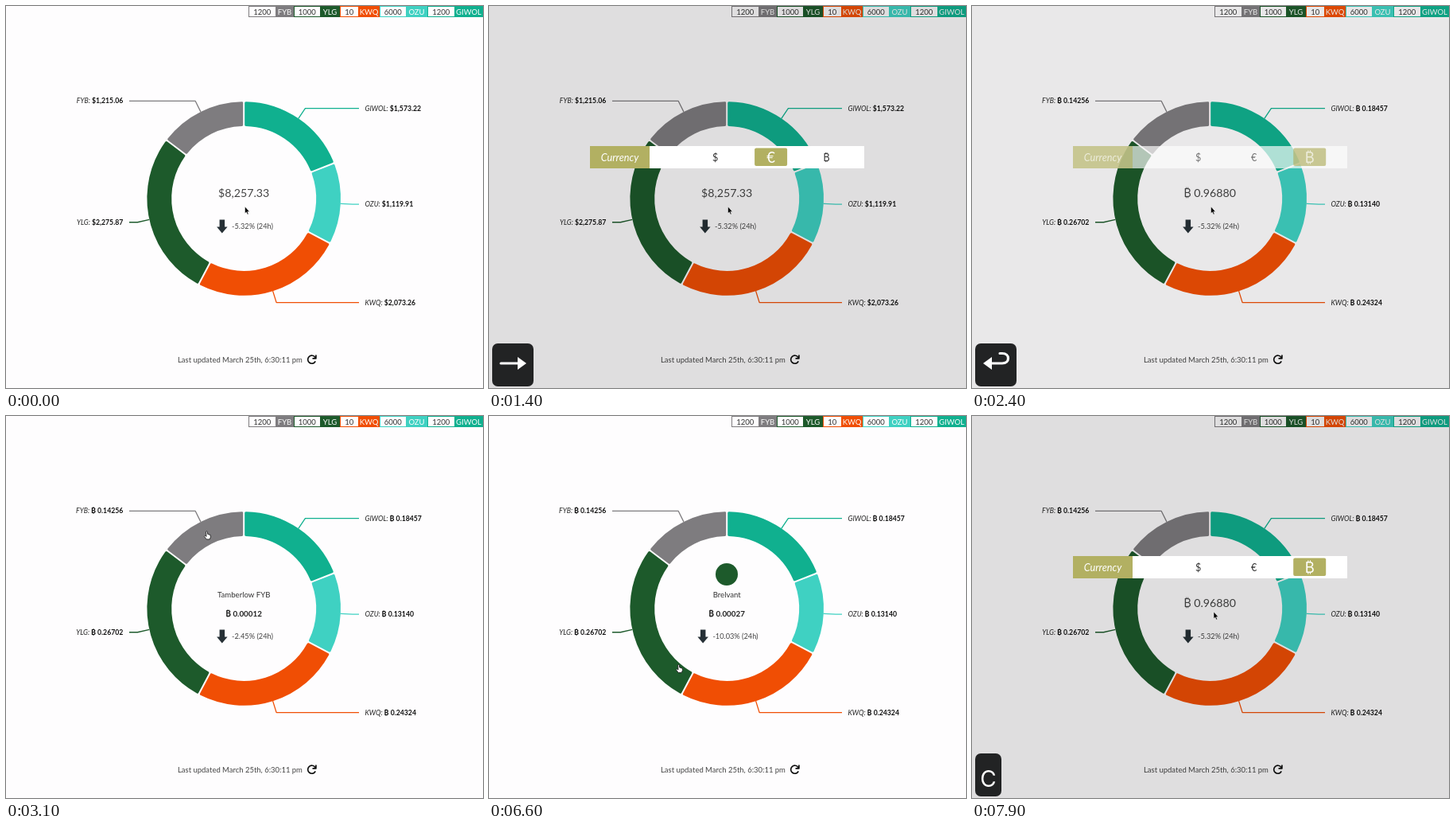
Animation of 600x480 px, one loop 8000 ms. Source, as an HTML page with a canvas:

```html
<!DOCTYPE html>
<html lang="en">
<head>
<meta charset="utf-8">
<title>Portfolio donut</title>
<style>
html, body { margin: 0; width: 600px; height: 480px; overflow: hidden; background: #fefdfe; }
canvas { display: block; }
</style>
</head>
<body>
<canvas width="600" height="480"></canvas>
<script>
const ctx = document.querySelector("canvas").getContext("2d");
const LOOP = 8000, CX = 299.2, CY = 241.9, OUTER = 121.8, INNER = 91, TAU = Math.PI * 2;
const PAPER = "#fefdfe", OLIVE = "#b2b062", INK = "#263036";

// x, split and end: edges of the holding's amount and ticker cells in the top bar
const coins = [
  { id: "GIWOL", name: "Giwo", amount: 1200, usd: 1573.22, btc: "0.18457", price: "0.00015", change: "-4.87", color: "#10b08f", x: 530, split: 564, end: 600, logo: "#222" },
  { id: "OZU", name: "Zelmiro", amount: 6000, usd: 1119.91, btc: "0.13140", price: "0.00002", change: "-1.53", color: "#3fd1c2", x: 470, split: 503, end: 530, logo: "#35cbb8" },
  { id: "KWQ", name: "Kwelor", amount: 10, usd: 2073.26, btc: "0.24324", price: "0.02432", change: "-6.21", color: "#f04e04", x: 420, split: 443, end: 470, logo: "#f04e04" },
  { id: "YLG", name: "Brelvant", amount: 1000, usd: 2275.87, btc: "0.26702", price: "0.00027", change: "-10.03", color: "#1d5a2b", x: 362, split: 395, end: 420, logo: "#1d5a2b" },
  { id: "FYB", name: "Tamberlow FYB", amount: 1200, usd: 1215.06, btc: "0.14256", price: "0.00012", change: "-2.45", color: "#7e7c7f", x: 305, split: 339, end: 362 }
];
const total = coins.reduce((sum, c) => sum + c.usd, 0);
let turn = 0;
for (const c of coins) {
  c.from = turn;
  turn += c.usd / total * TAU;
  c.to = turn;
}

// [time, x, y] of the pointer tip
const pointer = [
  [0, 300.5, 252], [2700, 300.5, 252], [3100, 252, 145], [3400, 252, 145], [3550, 308, 136],
  [3700, 375, 160], [3800, 375, 160], [4200, 404, 255], [4400, 404, 255], [4500, 402, 263],
  [4700, 372, 320], [4900, 372, 320], [5200, 310, 346], [5400, 239, 330], [6500, 239, 330],
  [6600, 238, 312.5], [7400, 304, 246], [8000, 304, 246]
];

const ramp = (t, a, b) => Math.min(1, Math.max(0, (t - a) / (b - a)));
const polar = (angle, r) => [CX + r * Math.sin(angle), CY - r * Math.cos(angle)];
const money = v => "$" + v.toLocaleString("en-US", { minimumFractionDigits: 2, maximumFractionDigits: 2 });

function pointerAt(t) {
  const i = Math.max(1, pointer.findIndex(p => p[0] >= t));
  const [t0, x0, y0] = pointer[i - 1], [t1, x1, y1] = pointer[i];
  const k = ramp(t, t0, t1);
  return [x0 + (x1 - x0) * k, y0 + (y1 - y0) * k];
}

function coinAt([x, y]) {
  const r = Math.hypot(x - CX, y - CY);
  if (r < INNER || r > OUTER) return null;
  const angle = (Math.atan2(x - CX, CY - y) + TAU) % TAU;
  return coins.find(c => angle < c.to);
}

function font(size, style = "") {
  ctx.font = `${style} ${size}px Lato, Inter, sans-serif`;
}

// y is the middle of the capitals
function text(s, x, y, size, color, align = "center", style = "") {
  font(size, style);
  ctx.fillStyle = color;
  ctx.textAlign = align;
  ctx.fillText(s, x, y + size * 0.36);
}

function box(x, y, w, h, color, radius = 0) {
  ctx.fillStyle = color;
  ctx.beginPath();
  ctx.roundRect(x, y, w, h, radius);
  ctx.fill();
}

function shape(d, x, y, fill, stroke, width = 1) {
  const path = new Path2D(d);
  ctx.save();
  ctx.translate(x, y);
  ctx.lineWidth = width;
  if (fill) { ctx.fillStyle = fill; ctx.fill(path); }
  if (stroke) { ctx.strokeStyle = stroke; ctx.stroke(path); }
  ctx.restore();
}

function drawHolding(c) {
  box(c.x, 0, c.end - c.x, 14, c.color);
  box(c.x + 1, 1, c.split - c.x - 1, 12, PAPER);
  text(c.amount, (c.x + c.split) / 2 + 0.3, 7.3, 9.5, "#333");
  text(c.id, (c.split + c.end) / 2, 7.3, 9.5, "#fff");
}

function drawSlice(c, inBtc) {
  const inset = 1.5, gap = 1 + inset;
  const ro = OUTER - inset, ri = INNER + inset, top = Math.PI / 2;
  ctx.beginPath();
  ctx.arc(CX, CY, ro, c.from + gap / ro - top, c.to - gap / ro - top);
  ctx.arc(CX, CY, ri, c.to - gap / ri - top, c.from + gap / ri - top, true);
  ctx.closePath();
  ctx.fillStyle = ctx.strokeStyle = c.color;
  ctx.lineJoin = "round";
  ctx.lineWidth = inset * 2;
  ctx.fill();
  ctx.stroke();

  const mid = (c.from + c.to) / 2, right = mid < Math.PI;
  const [ex, ey] = polar(mid, 137);
  ctx.beginPath();
  ctx.moveTo(...polar(mid, OUTER));
  ctx.lineTo(ex, ey);
  ctx.lineTo(right ? 444 : 155, ey);
  ctx.lineWidth = 1.3;
  ctx.stroke();

  const value = inBtc ? "₿ " + c.btc : money(c.usd), label = c.id + ": ";
  font(8.7, "bold");
  const valueWidth = ctx.measureText(value).width;
  font(8.7, "italic");
  const split = right ? 451.5 + ctx.measureText(label).width : 147.3 - valueWidth;
  text(label, split, ey, 8.7, "#222", "right", "italic");
  text(value, split, ey, 8.7, "#111", "left", "bold");
}

function drawCentre(coin, inBtc) {
  if (coin) {
    if (coin.logo) box(285, 185, 28, 28, coin.logo, 14);
    text(coin.name, CX, 224.5, 9.6, "#333");
    text("₿ " + coin.price, CX, 248.5, 9.8, "#222", "center", "bold");
  } else {
    text(inBtc ? "₿ 0.96880" : "$8,257.33", CX, 235, 14.2, "#444");
  }
  const change = `${coin ? coin.change : "-5.32"}% (24h)`;
  font(9.2);
  const left = 300.5 - (19 + ctx.measureText(change).width) / 2;
  shape("M3.5 0H10V9H13.5L6.7 17L0 9H3.5Z", left, 268.5, INK);
  text(change, left + 19, 277, 9.2, "#444", "left");
}

function drawFooter() {
  text("Last updated March 25th, 6:30:11 pm", 216, 445, 9.47, "#444", "left");
  shape("M4.4 -2.9A5 5 0 1 0 4.7 1.8M5.4 -6V-1.7H1", 384.5, 444.5, null, "#111", 1.7);
}

function drawModal(alpha, selected) {
  if (!alpha) return;
  ctx.globalAlpha = alpha;
  box(0, 0, 600, 480, "rgba(0,0,0,.122)");
  box(127, 176, 345, 28, "#fff");
  box(127, 176, 75, 28, OLIVE);
  text("Currency", 164.5, 190, 12.7, "#fff", "center", "italic");
  ["$", "€", "₿"].forEach((sign, i) => {
    const x = 284.5 + 70.1 * i, on = i === selected;
    if (on) box(x - 20.5, 178.5, 41, 22.5, OLIVE, 2);
    text(sign, x, 190, on ? 18.5 : 12.5, on ? "#fff" : "#333");
  });
  ctx.globalAlpha = 1;
}

function drawKey(key, alpha) {
  if (alpha <= 0) return;
  ctx.globalAlpha = alpha;
  box(4, 424, key === "C" ? 33 : 52, 54, "#222324", 7);
  ctx.lineCap = "round";
  if (key === "C") {
    ctx.font = "28px Inter, sans-serif";
    ctx.fillStyle = "#fff";
    ctx.textAlign = "center";
    ctx.fillText("C", 20.5, 466);
  } else if (key === "right") {
    shape("M15 449H40", 0, 0, null, "#fff", 3.2);
    shape("M36 441L47 449L36 457Z", 0, 0, "#fff");
  } else {
    shape("M20 449H38C48 449 48 436.5 38 436.5H35", 0, 0, null, "#fff", 3.2);
    shape("M14 449L25 441V457Z", 0, 0, "#fff");
  }
  ctx.lineCap = "butt";
  ctx.globalAlpha = 1;
}

function drawPointer([x, y], hand) {
  if (hand) shape("M-.4 .4Q.5 -.6 1.4 .4L1.7 3.4L5 4.4L5.5 7L4.2 10H.2L-2.6 6.4L-1.5 5.4L0 6.4Z", x, y, "#fff", "#222", 0.9);
  else shape("M0 0V8.6L1.9 6.9L3.2 10L4.6 9.4L3.3 6.4H5.8Z", x, y, "#000", "#fff", 0.5);
}

function render(t) {
  const inBtc = t >= 2200;
  const tip = pointerAt(t), hovered = coinAt(tip);
  const reopened = t >= 7700;
  ctx.fillStyle = PAPER;
  ctx.fillRect(0, 0, 600, 480);
  coins.forEach(drawHolding);
  coins.forEach(c => drawSlice(c, inBtc));
  drawCentre(hovered, inBtc);
  drawFooter();
  drawModal(reopened ? ramp(t, 7700, 7900) : ramp(t, 0, 200) - ramp(t, 2300, 2600),
    t < 900 ? 0 : t < 1500 ? 1 : 2);

  if (reopened) drawKey("C", ramp(t, 7700, 7800));
  else if (t < 900) drawKey("C", ramp(t, 0, 100) - ramp(t, 700, 900));
  else if (t < 2200) drawKey("right", 1 - ramp(t, 1900, 2100));
  else drawKey("return", 1 - ramp(t, 2500, 2700));
  drawPointer(tip, hovered);
}

// The picture advances ten times a second
function tick(now) {
  render(Math.floor(now % LOOP / 100) * 100);
  requestAnimationFrame(tick);
}
requestAnimationFrame(tick);
</script>
</body>
</html>
```
